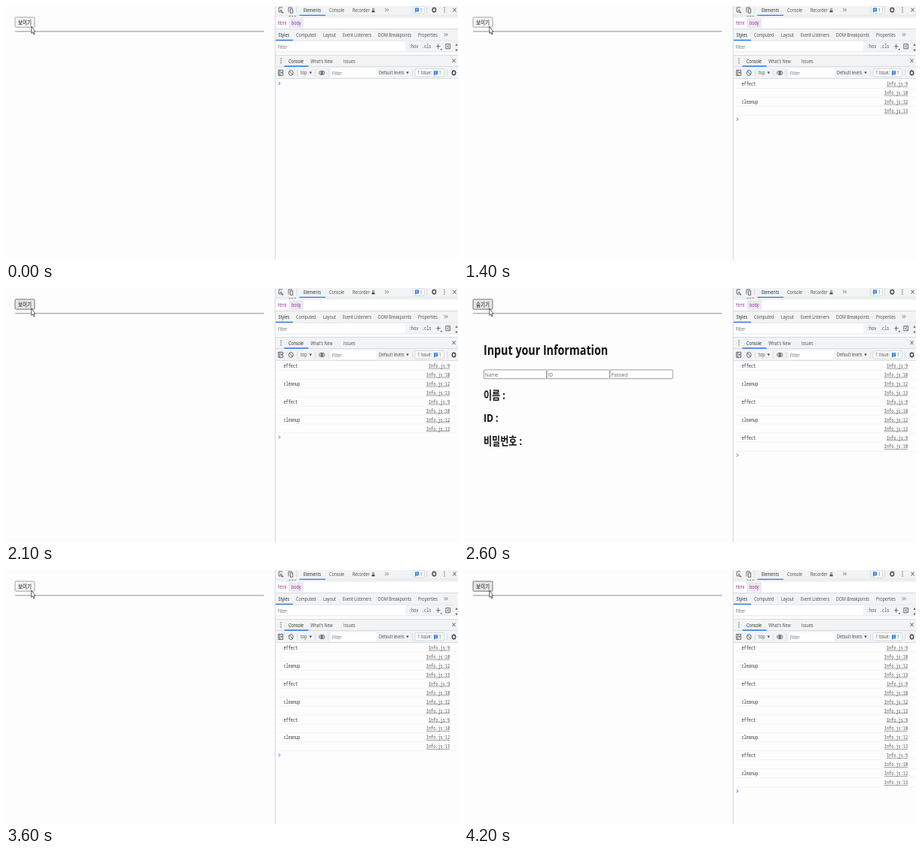
Recreate the animation shown at these times as an HTML page with a canvas. Size 600 by 338 pixels, loop 4500 ms.

```html
<!DOCTYPE html>
<html lang="ko">
<head>
<meta charset="utf-8">
<title>Effect cleanup demo</title>
<style>
html, body { margin: 0; width: 100%; height: 100%; overflow: hidden; background: #fdfdfe; }
canvas { display: block; width: 600px; height: 338px; }
</style>
</head>
<body>
<canvas id="stage"></canvas>
<script>
const W = 600, H = 338, LOOP = 4500;
const ASPECT = 0.82; // the whole screen is narrowed to this stage
const SANS = '"Open Sans", "Noto Sans CJK KR", "Noto Sans CJK", sans-serif';
const KO = '"Noto Sans CJK KR", "Noto Sans CJK", sans-serif';
const MONO = '"Noto Sans Mono", monospace';
const INK = '#444a50', BLUE = '#1a73e8', BAR = '#f1f3f4', LINE = '#cfd2d6', HINT = '#666a6e';

const toggles = [100, 1000, 1500, 2000, 2600, 3100, 3700, 4200];
const presses = [0, 900, 1400, 1800, 2500, 3000, 3600, 4100];
const PRESS_MS = 100;

const canvas = document.getElementById('stage');
const ctx = canvas.getContext('2d');
const dpr = window.devicePixelRatio || 1;
canvas.width = W * dpr;
canvas.height = H * dpr;

function box(x, y, w, h, color) {
  ctx.fillStyle = color;
  ctx.fillRect(x, y, w, h);
}

function frame(x, y, w, h, fill, stroke, r = 0, lw = 0.8) {
  ctx.beginPath();
  ctx.roundRect(x, y, w, h, r);
  ctx.fillStyle = fill;
  ctx.fill();
  ctx.strokeStyle = stroke;
  ctx.lineWidth = lw;
  ctx.stroke();
}

function text(s, x, y, { size = 6.56, color = INK, font = SANS, weight = 400, align = 'left' } = {}) {
  ctx.save();
  ctx.translate(x, y);
  ctx.scale(ASPECT, 1);
  ctx.font = `${weight} ${size}px ${font}`;
  ctx.textAlign = align;
  ctx.fillStyle = color;
  ctx.fillText(s, 0, 0);
  ctx.restore();
}

function path(points, color = INK, lw = 0.8) {
  ctx.beginPath();
  points.forEach(([x, y], i) => i ? ctx.lineTo(x, y) : ctx.moveTo(x, y));
  ctx.strokeStyle = color;
  ctx.lineWidth = lw;
  ctx.stroke();
}

function ring(x, y, rx, ry, color = INK, lw = 0.8) {
  ctx.beginPath();
  ctx.ellipse(x, y, rx, ry, 0, 0, Math.PI * 2);
  ctx.strokeStyle = color;
  ctx.lineWidth = lw;
  ctx.stroke();
}

function triangle(x, y, w, h, color = INK) {
  ctx.beginPath();
  ctx.moveTo(x - w / 2, y - h / 2);
  ctx.lineTo(x + w / 2, y - h / 2);
  ctx.lineTo(x, y + h / 2);
  ctx.fillStyle = color;
  ctx.fill();
}

function gear(x, y) {
  for (let i = 0; i < 8; i++) {
    const a = i * Math.PI / 4, c = Math.cos(a), s = Math.sin(a);
    path([[x + c * 2, y + s * 2.4], [x + c * 3.2, y + s * 3.8]], INK, 1.2);
  }
  ring(x, y, 2.1, 2.6, INK, 1.2);
}

function cross(x, y) {
  path([[x - 2, y - 2.4], [x + 2, y + 2.4]], INK, 0.9);
  path([[x + 2, y - 2.4], [x - 2, y + 2.4]], INK, 0.9);
}

function kebab(x, y) {
  for (const d of [-2.8, 0, 2.8]) box(x - 0.6, y + d - 0.6, 1.2, 1.2, INK);
}

function chevrons(x, y) {
  for (const d of [-2.2, 0.3])
    path([[x + d, y - 2], [x + d + 1.8, y], [x + d, y + 2]], INK, 0.7);
}

function bubble(x, y) {
  box(x, y, 5, 4.8, BLUE);
  box(x, y + 4.8, 1.3, 1.2, BLUE);
  box(x + 1, y + 1.2, 3, 0.6, '#fff');
  box(x + 1, y + 2.8, 3, 0.6, '#fff');
}

function separator(x, y) {
  box(x, y, 0.7, 9, LINE);
}

function rule(y) {
  box(358, y, 242, 0.7, LINE);
}

function drawTopBar() {
  box(358, 0, 242, 13, BAR);
  rule(12.5);
  path([[367, 2], [362.2, 2], [362.2, 8], [364, 8]]);
  path([[368, 9.2], [364.8, 4.8], [364.8, 8.2], [368, 9.2]]);
  path([[375, 8.5], [375, 2], [380, 2]]);
  frame(377.4, 3.8, 3.2, 5.6, BAR, INK);
  separator(385.5, 1);
  text('Elements', 395, 8, { color: '#202124' });
  box(389.5, 11.8, 34.5, 1.3, BLUE);
  text('Console', 429, 8);
  text('Recorder', 460, 8);
  path([[486.8, 2.8], [486.8, 5], [485.5, 8], [489.5, 8], [488.2, 5], [488.2, 2.8]], INK, 0.7);
  box(486, 6.2, 3, 1.8, INK);
  chevrons(505.5, 5.2);
  frame(540, 0.2, 15.5, 10, '#f8f9fa', LINE, 1.5);
  bubble(543, 2.5);
  text('1', 549.8, 8, { color: BLUE });
  separator(558.5, 1);
  gear(568.3, 5.2);
  kebab(582, 5.2);
  cross(595.5, 5.2);
}

function drawStyles() {
  box(358, 13.2, 242, 17, '#fff');
  for (let i = 0; i < 3; i++) box(375.5 + i * 3.6, 13.2, 2.2, 0.9, '#777');
  rule(14.4);
  box(375.5, 16.2, 19.5, 13, '#e9e9f2');
  text('html', 360.8, 25.3, { color: '#9a1d8e' });
  text('body', 379, 25.3, { color: '#9a1d8e' });
  box(358, 30, 242, 16.2, BAR);
  rule(30);
  const tabs = [['Computed', 385], ['Layout', 421], ['Event Listeners', 447],
    ['DOM Breakpoints', 493.8], ['Properties', 547]];
  text('Styles', 361.5, 40.6, { color: '#202124' });
  tabs.forEach(([s, x]) => text(s, x, 40.6));
  chevrons(584, 38.2);
  rule(45.8);
  box(358, 44.8, 23, 1.4, BLUE);
  box(358, 46.5, 242, 14.5, BAR);
  box(358, 47, 172, 13.5, '#fff');
  text('Filter', 360.8, 56.6, { color: HINT });
  text(':hov', 535, 56.2, { font: MONO, size: 6.35 });
  text('.cls', 552, 56.2, { font: MONO, size: 6.35 });
  path([[571, 53.7], [576.5, 53.7]]);
  path([[573.7, 50.5], [573.7, 56.9]]);
  box(577, 57, 1.5, 1.5, INK);
  frame(583.8, 50.6, 5.6, 6.2, BAR, INK);
  path([[588, 52], [585.7, 53.7], [588, 55.4]]);
  box(594.5, 46.5, 5.5, 14.5, '#f1f1f1');
  triangle(598, 51.5, 3.2, -2.4, '#555');
  triangle(598, 59, 3.2, 2.4, '#555');
  rule(60.8);
}

function drawDrawerBars() {
  box(358, 61.5, 242, 4, '#fff');
  box(358, 65, 242, 15.5, BAR);
  rule(65);
  kebab(365, 73);
  text('Console', 375, 75.6, { color: '#202124' });
  text("What's New", 404.3, 75.6);
  text('Issues', 448, 75.6);
  cross(594.5, 72.8);
  rule(80.2);
  box(369.5, 79.4, 32, 1.4, BLUE);

  box(358, 81, 242, 15.5, BAR);
  frame(361.6, 85.4, 6, 7, BAR, INK);
  path([[363.4, 85.4], [363.4, 92.4]]);
  triangle(365.8, 89, 2.4, 2.4);
  ring(378.3, 89, 2.9, 3.5);
  path([[376.4, 86.5], [380.2, 91.5]]);
  separator(386, 84.5);
  text('top', 391, 91.4);
  triangle(404.3, 89, 3.4, 2.8);
  separator(410.5, 84.5);
  ring(419.3, 89, 3.7, 2.7);
  ring(419.3, 89, 1.1, 1.3, INK, 1.2);
  separator(427.5, 84.5);
  box(431, 83, 60.5, 11.8, '#fff');
  text('Filter', 433, 91.9, { color: HINT });
  text('Default levels', 495, 91.4);
  triangle(533, 89, 3.4, 2.8);
  separator(539, 84.5);
  frame(543, 83.5, 38.5, 10.7, '#f8f9fa', LINE, 1.5);
  text('1 Issue:', 546.2, 91.4);
  bubble(568, 86.3);
  text('1', 574.8, 91.4, { color: BLUE });
  separator(585.5, 84.5);
  gear(594.5, 89);
  rule(96.2);
}

function drawLog(count) {
  const pitch = 11.95, first = 103.5;
  const lineNos = [9, 10, 12, 13];
  const labels = ['effect', '', 'cleanup', ''];
  const mono = { font: MONO, size: 6.35, color: '#303236' };
  for (let i = 0; i < count; i++) {
    const y = first + i * pitch;
    text(labels[i % 4], 368.5, y + 2.4, mono);
    const link = 'Info.js:' + lineNos[i % 4];
    text(link, 589, y + 2.4, { ...mono, color: '#4b4f54', align: 'right' });
    const w = link.length * 3.13;
    box(589 - w, y + 3.4, w, 0.6, '#666');
    box(358, y + 5.5, 242, 0.6, '#eeeef0');
  }
  const y = first + count * pitch - 0.5;
  path([[361.8, y - 2], [363.8, y], [361.8, y + 2]], BLUE, 1);
}

function drawForm() {
  const head = { weight: 700, color: '#111' };
  text('Input your Information', 26, 89.4, { ...head, size: 17.4 });
  ['Name', 'ID', 'Passwd'].forEach((s, i) => {
    const x = 26.4 + i * 83.7;
    frame(x, 108.9, 83.3, 11.8, '#fff', '#858585', 0.8);
    text(s, x + 1.6, 117.5, { size: 7.6, color: HINT });
  });
  ['이름 :', 'ID :', '비밀번호 :'].forEach((s, i) =>
    text(s, 26, 147.9 + i * 30.3, { ...head, size: 14.7 }));
}

function drawPage(shown, pressed) {
  frame(12, 15, 26, 13.2, pressed ? '#f5f5f5' : '#e6e6e6', pressed ? '#8d8d8d' : '#555', 1.3);
  text(shown ? '숨기기' : '보이기', 15.9, 24.7, { size: 8, font: KO, color: '#111' });
  box(12, 33.4, 330.5, 0.9, '#858585');
  if (shown) drawForm();
}

function drawCursor() {
  const p = [[33.7, 27], [33.7, 36.4], [35.5, 34.8], [36.8, 38], [38, 37.4], [36.7, 34.3], [38.9, 34.1]];
  ctx.beginPath();
  p.forEach(([x, y]) => ctx.lineTo(x, y));
  ctx.closePath();
  ctx.fillStyle = '#fff';
  ctx.fill();
  ctx.strokeStyle = '#222';
  ctx.lineWidth = 0.7;
  ctx.stroke();
}

function draw(t) {
  const done = toggles.filter(at => t >= at).length;
  const pressed = presses.some(at => t >= at && t < at + PRESS_MS);
  ctx.setTransform(dpr, 0, 0, dpr, 0, 0);
  box(0, 0, W, H, '#fdfdfe');
  drawPage(done % 2 === 1, pressed);
  drawTopBar();
  drawStyles();
  drawDrawerBars();
  drawLog(done * 2);
  box(356.8, 0, 0.9, H, LINE);
  drawCursor();
}

const start = performance.now();
function tick() {
  draw((performance.now() - start) % LOOP);
  requestAnimationFrame(tick);
}
tick();
</script>
</body>
</html>
```
